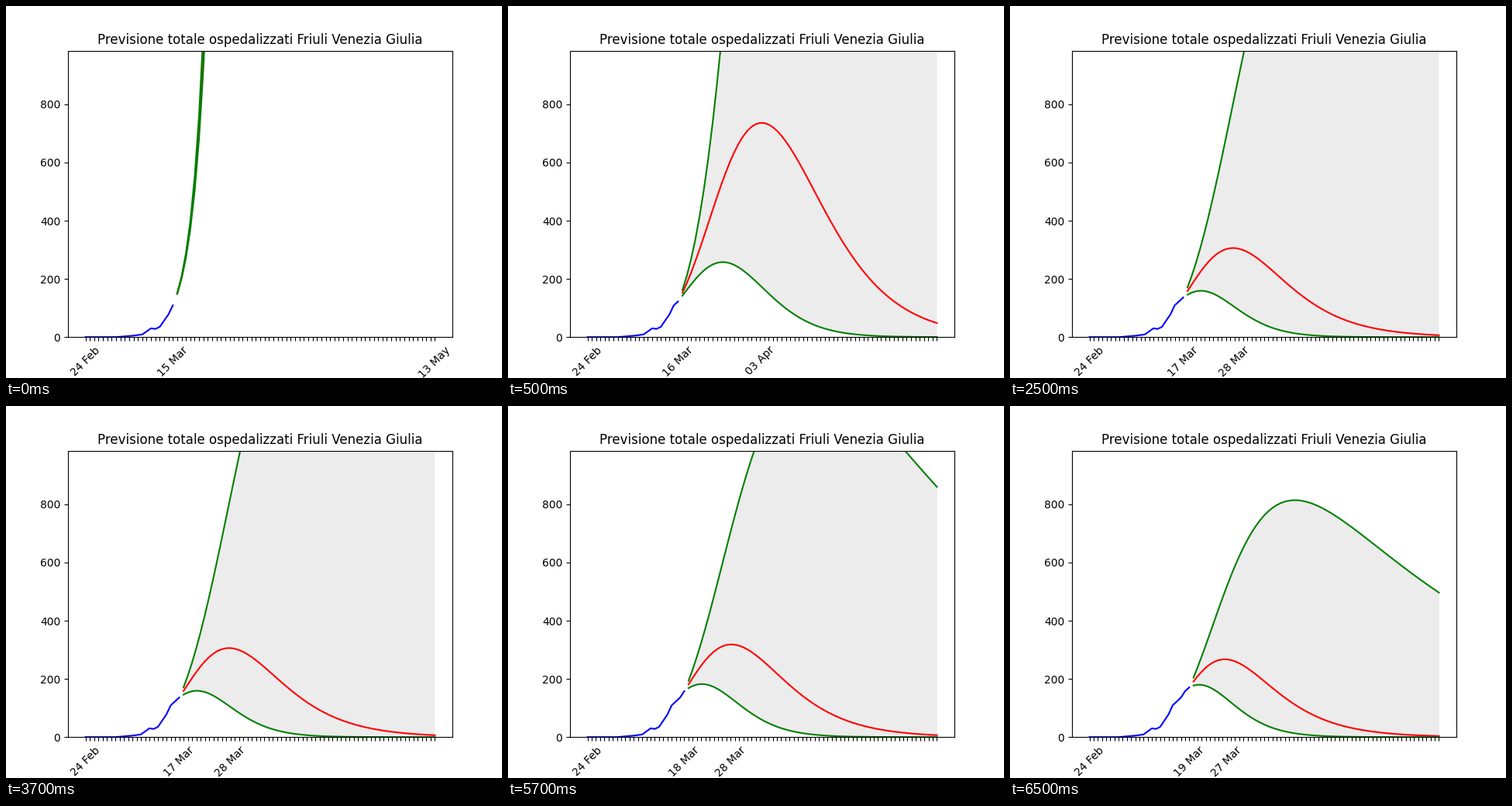
Write a matplotlib script that moves like this. It is 640 by 480 pixels and loops after 8000 ms.

```python
import numpy as np
import matplotlib.pyplot as plt
from matplotlib.animation import FuncAnimation

plt.rcdefaults()

FIRST_KNOWN = 21
FORECAST_DAYS = 60
Y_MAX = 984.4

# Turning points of the recorded curve; days between them are interpolated.
KEY_DAYS = [7, 11, 13, 15, 16, 17, 19, 20, 22, 23, 24]
KEY_COUNTS = [0, 5, 9, 30, 28, 35, 78, 109, 136, 158, 171]
hospitalised = np.interp(np.arange(25), KEY_DAYS, KEY_COUNTS)

# Daily rate model of each forecast: (growth, decay, loss, spread)
MODELS = [
    (0.370, 0, 0, 0.0125),
    (0.338, 0.0645, 0.1, 0.079),
    (0.2634, 0.0865, 0.1, 0.092),
    (0.2446, 0.0837, 0.1, 0.08),
    (0.2153, 0.0955, 0.1, 0.08),
]


def date_label(day):
    """Date of the given day, counted from 24 February."""
    day += 24
    for month, length in (("Feb", 29), ("Mar", 31), ("Apr", 30), ("May", 31)):
        if day <= length:
            return f"{day:02d} {month}"
        day -= length


def forecast(last, growth, decay, loss, shift=0):
    """Compound a daily rate that fades from growth towards a steady loss."""
    rate = growth * np.exp(-decay * np.arange(FORECAST_DAYS)) - loss + shift
    return last * np.cumprod(1 + rate)


fig, ax = plt.subplots(figsize=(6.4, 4.8), dpi=100)


def draw(frame):
    stage = (frame + 3) // 4
    known = FIRST_KNOWN + stage
    total = known + FORECAST_DAYS
    days = np.arange(known, total)
    *model, spread = MODELS[stage]
    expected, low, high = (forecast(hospitalised[known - 1], *model, shift)
                           for shift in (0, -spread, spread))
    peak = known + int(np.argmax(expected))
    # Keep far off-scale values within drawable range.
    expected, low, high = np.minimum([expected, low, high], 2e4)

    ax.clear()
    ax.plot(hospitalised[:known], color="b")
    ax.plot(days, expected, color="r")
    ax.plot(days, low, color="g")
    ax.plot(days, high, color="g")
    ax.fill_between(days, low, high, color="gray", alpha=0.15, linewidth=0)

    labels = [""] * total
    labels[0] = date_label(0)
    labels[known - 1] = date_label(known - 1)
    labels[peak] = date_label(peak - 1)
    ax.set_xticks(range(total), labels, rotation=45)
    margin = 0.05 * (total - 1)
    ax.set_xlim(-margin, total - 1 + margin)
    ax.set_ylim(0, Y_MAX)
    ax.set_title("Previsione totale ospedalizzati Friuli Venezia Giulia")
    return []


anim = FuncAnimation(fig, draw, frames=16, interval=500, repeat=True,
                     repeat_delay=0, init_func=lambda: [])
plt.show()
```
